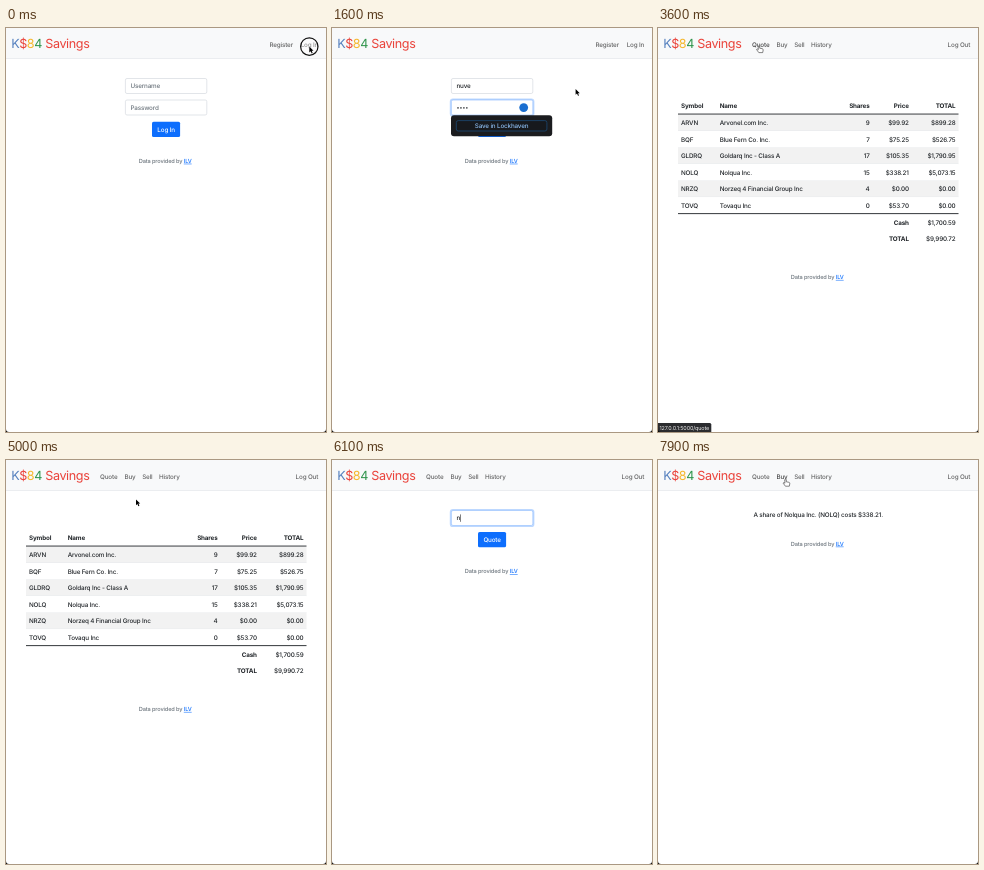
Write an HTML page that moves like this. It is 320x404 px and loops after 8000 ms.

```html
<!DOCTYPE html>
<html lang="en">
<head>
<meta charset="utf-8">
<title>Trading demo</title>
<style>
html, body { margin: 0; height: 100%; overflow: hidden; background: #fff; }
svg { display: block; width: 100%; height: 100%; }
text { font: 500 6.3px Inter, "Liberation Sans", sans-serif; letter-spacing: -.025em; fill: #212529; text-rendering: geometricPrecision; white-space: pre; }
.brand { font-size: 12.6px; font-weight: 400; letter-spacing: -.03em; }
.nav { fill: rgba(0,0,0,.6); }
.nav.hot { fill: rgba(0,0,0,.72); }
.bold { font-weight: 700; }
.hint { fill: #6c757d; }
.foot { font-size: 5.65px; fill: #6c757d; }
.link { fill: #0d6efd; text-decoration: underline; }
.white { fill: #fff; }
.offer { fill: #8dbdf0; }
.status { font-size: 5.45px; font-weight: 400; fill: #eee; }
</style>
</head>
<body>
<svg id="stage" viewBox="0 0 320 404"></svg>
<script>
const LOOP = 8000, STEP = 100;
const stage = document.getElementById('stage');

const text = (x, y, s, cls = '', anchor = 'start') =>
  `<text x="${x}" y="${y}" class="${cls}" text-anchor="${anchor}">${s}</text>`;
const rect = (x, y, w, h, fill, extra = '') =>
  `<rect x="${x}" y="${y}" width="${w}" height="${h}" fill="${fill}" ${extra}/>`;
const ring = (x, y, w, h, opacity) =>
  rect(x - .8, y - .8, w + 1.6, h + 1.6, 'none', `rx="2.4" stroke="#0d6efd" stroke-opacity="${opacity}" stroke-width="1.6"`);

function field(y, focused) {
  return (focused ? ring(119.4, y, 81.4, 15, .27) : '') +
    rect(119.4, y, 81.4, 15, '#fff', `rx="1.6" stroke="${focused ? '#86b7fe' : '#ced4da'}" stroke-width=".6"`);
}

function button(y, label, hot) {
  return (hot ? ring(146, y, 28.1, 15.4, .5) : '') +
    rect(146, y, 28.1, 15.4, hot ? '#0b5ed7' : '#0d6efd', 'rx="1.6"') +
    text(160.1, y + 10, label, 'white', 'middle');
}

const footer = y =>
  text(132.8, y, 'Data provided by <tspan class="link">ILV</tspan>', 'foot');

function navbar(loggedIn, hot) {
  const item = (x, s, anchor) => text(x, 19.2, s, 'nav' + (s === hot ? ' hot' : ''), anchor);
  const letters = [['K', '#537fbe'], ['$', '#ea433b'], ['8', '#f5b82e'], ['4', '#2e944b'], [' Savings', '#ea433b']];
  return rect(0, 0, 320, 30, '#f8f9fa') + rect(0, 30, 320, .6, '#dee2e6') +
    text(5.2, 20.4, letters.map(([s, c]) => `<tspan fill="${c}">${s}</tspan>`).join(''), 'brand') +
    (loggedIn
      ? item(94, 'Quote') + item(118.5, 'Buy') + item(136.2, 'Sell') + item(153, 'History') + item(312.2, 'Log Out', 'end')
      : item(263.4, 'Register') + item(312.2, 'Log In', 'end'));
}

// Characters typed by time t, given the start and the time per key
const typed = (t, start, pace, n) => Math.max(0, Math.min(n, Math.floor((t - start) / pace) + 1));

function login(t) {
  const user = 'nuve'.slice(0, typed(t, 700, 100, 4));
  const dots = typed(t, 1200, 100, 4);
  const inUser = t >= 200 && t < 1100, inPass = t >= 1100 && t < 1800;
  let out = field(50.5, inUser) +
    (user ? '' : text(124.4, 60.3, 'Username', 'hint')) +
    `<text id="entry" x="124.4" y="60.3">${user}</text>` + field(72, inPass);
  if (!dots) out += text(124.4, 81.8, 'Password', 'hint');
  for (let i = 0; i < dots; i++) out += `<circle cx="${126 + 2.95 * i}" cy="79.9" r=".8" fill="#34383c"/>`;
  out += button(93.7, 'Log In', t >= 2000) + footer(134.7);
  if (inPass) out += '<circle cx="191.7" cy="79.6" r="4.4" fill="#1a6ed0"/>';
  if (inPass && dots) {
    out += rect(119, 87.2, 101.2, 21, '#1b1c1f', 'rx="3"') +
      rect(124.3, 92.6, 90.6, 10.4, '#17191d', 'rx="2" stroke="#1c4a74" stroke-width=".8"') +
      text(169.6, 100, 'Save in Lockhaven', 'offer', 'middle');
  }
  return out;
}

const holdings = [
  ['ARVN', 'Arvonel.com Inc.', 9, '$99.92', '$899.28'],
  ['BQF', 'Blue Fern Co. Inc.', 7, '$75.25', '$526.75'],
  ['GLDRQ', 'Goldarq Inc - Class A', 17, '$105.35', '$1,790.95'],
  ['NOLQ', 'Nolqua Inc.', 15, '$338.21', '$5,073.15'],
  ['NRZQ', 'Norzeq 4 Financial Group Inc', 4, '$0.00', '$0.00'],
  ['TOVQ', 'Tovaqu Inc', 0, '$53.70', '$0.00']
];
const columns = [23, 61.7, 211.6, 250.8, 297.5];
const row = (cells, y, cls) =>
  cells.map((s, i) => text(columns[i], y, s, cls, i < 2 ? 'start' : 'end')).join('');

function portfolio() {
  let out = row(['Symbol', 'Name', 'Shares', 'Price', 'TOTAL'], 80, 'bold');
  holdings.forEach((h, i) => {
    const y = 86.5 + 16.52 * i;
    out += rect(20, y, 280.5, 16.5, i % 2 ? '#fff' : '#f2f2f2') +
      rect(20, y + 16.2, 280.5, .4, '#dee2e6') + row(h, y + 10.6);
  });
  for (const y of [85.6, 185.2]) out += rect(20, y, 280.5, .9, '#212529');
  [['Cash', '$1,700.59', 196.9], ['TOTAL', '$9,990.72', 213.1]].forEach(([name, sum, y]) => {
    out += text(columns[3], y, name, 'bold', 'end') + text(columns[4], y, sum, '', 'end');
  });
  return out + footer(250.9);
}

function quote(t) {
  const s = t < 6100 ? '' : 'nolq'.slice(0, 1 + typed(t, 6300, 200, 3));
  return field(50.5, true) + (s ? '' : text(124.4, 60.3, 'Symbol', 'hint')) +
    `<text id="entry" x="124.4" y="60.3">${s}</text>` +
    button(71.9, 'Quote', false) + footer(113);
}

const result = () =>
  text(160.2, 57.4, 'A share of Nolqua Inc. (NOLQ) costs $338.21.', '', 'middle') + footer(85.6);

// Pointer paths: [time, x, y]; hidden between paths while keys are pressed
const paths = [
  [[0, 303.3, 18.6], [100, 303.3, 18.6], [500, 243.6, 61], [600, 243.6, 61]],
  [[1600, 243.6, 61], [1700, 262, 121], [1800, 262, 121], [2100, 156.6, 101.2], [2800, 156.6, 101.2],
   [3300, 101, 17.4], [3600, 101, 17.4], [4000, 258, 208], [4400, 130, 41], [4500, 130, 39.4],
   [5000, 130, 39.4], [5300, 101, 17.4], [5700, 101, 17.4], [5800, 112, 31], [5900, 130, 43.5], [6000, 130, 43.5]],
  [[7600, 213, 50], [7900, 127.6, 19]]
];

function pointerAt(t) {
  const path = paths.find(p => t >= p[0][0] && t <= p[p.length - 1][0]);
  if (!path) return null;
  const i = path.findIndex(p => p[0] >= t);
  if (i < 1) return path[0].slice(1);
  const [t0, x0, y0] = path[i - 1], [t1, x1, y1] = path[i];
  const k = (t - t0) / (t1 - t0);
  return [x0 + (x1 - x0) * k, y0 + (y1 - y0) * k];
}

const within = (t, a, b) => t >= a && t < b;

function pointer(t, hand) {
  const p = pointerAt(t);
  if (!p) return '';
  const click = t < 100 || within(t, 1700, 1800);
  return `<g transform="translate(${p})">` +
    (click ? '<circle r="8.7" fill="#fff" fill-opacity=".4" stroke="#111" stroke-width="1.2"/>' : '') +
    (hand
      ? '<path d="M-.7.6q.7-1 1.4 0v2.2l2.6.5q1 .3.9 1.3l-.5 2.6h-3.9l-2.2-3q.2-.9 1-.5l.7.6z" fill="#fff" stroke="#222" stroke-width=".55"/>'
      : '<path d="M0 0v5.8l1.4-1.2 1 2.2 1-.4-1-2.2h1.8z" stroke="#fff" stroke-width=".8" paint-order="stroke"/>') +
    '</g>';
}

function draw(t) {
  const onQuote = within(t, 3300, 3700) || within(t, 5300, 5800);
  const onBuy = t >= 7900;
  const onButton = within(t, 2000, 2900);
  const hot = onQuote ? 'Quote' : onBuy ? 'Buy' : t < 100 ? 'Log In' : '';
  const page = t < 2900 ? login : t < 5500 ? portfolio : t < 7000 ? quote : result;
  const status = within(t, 3300, 3800) || within(t, 5300, 5900);
  stage.innerHTML = rect(0, 0, 320, 404, '#fff') + navbar(t >= 2900, hot) + page(t) +
    (status ? rect(-2, 395, 55.3, 11, '#2b2c2f', 'rx="1.5"') + text(1.4, 401.8, '127.0.0.1:5000/quote', 'status') : '') +
    '<path d="M0 404v-3q0 3 3 3zM320 404v-3q0 3-3 3z"/>' +
    pointer(t, onQuote || onBuy || onButton);
  const entry = stage.querySelector('#entry');
  if (entry && (within(t, 200, 1100) || t >= 5500)) {
    const x = 124.6 + (entry.textContent ? entry.getComputedTextLength() : 0);
    entry.insertAdjacentHTML('afterend', rect(x, 54.4, .5, 7.4, '#000'));
  }
}

let last = -1;
const begin = performance.now();
function tick() {
  const t = Math.floor((performance.now() - begin) % LOOP / STEP) * STEP;
  if (t !== last) draw(last = t);
  requestAnimationFrame(tick);
}
tick();
</script>
</body>
</html>
```
